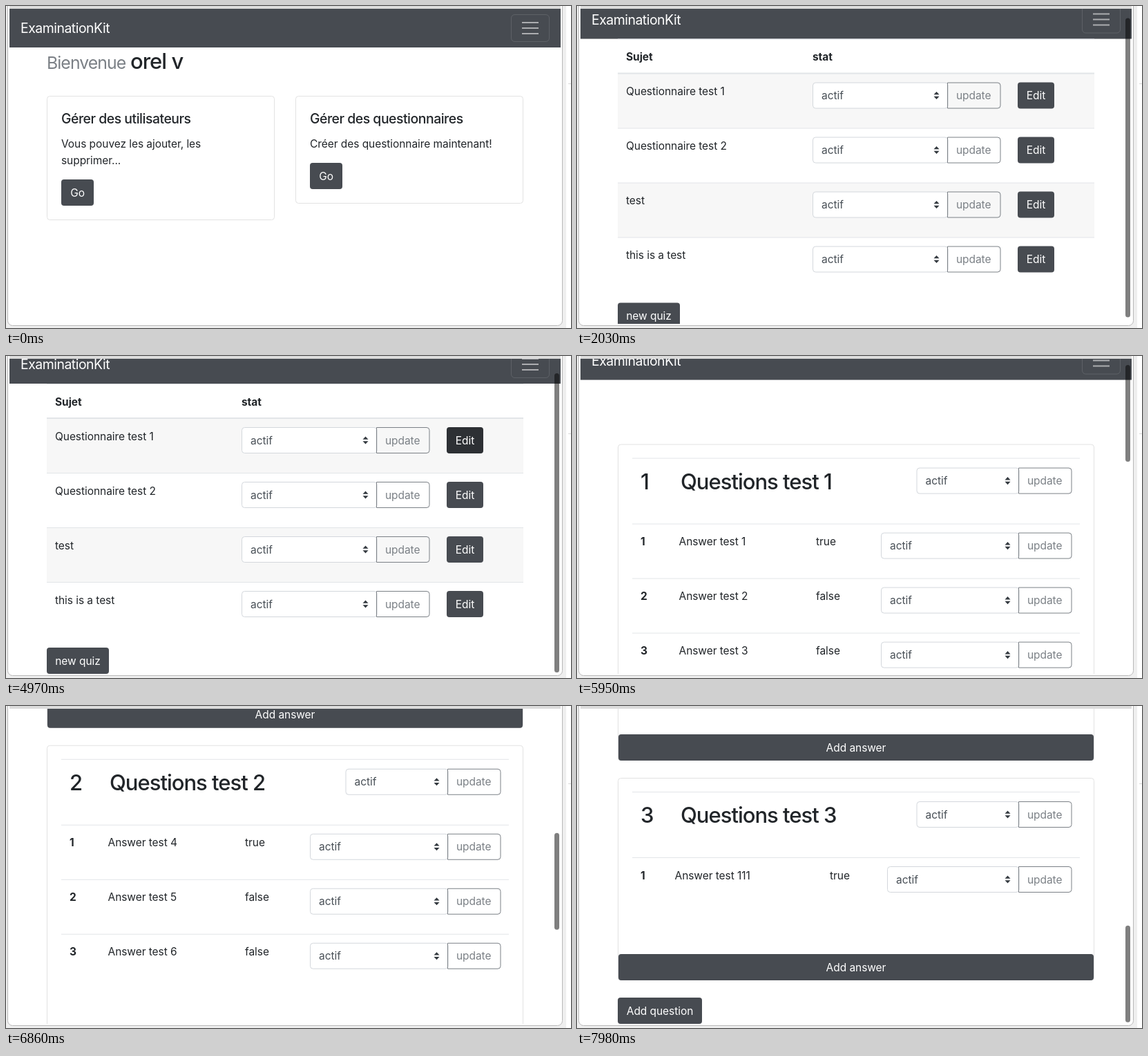
An HTML page that plays this animation: 818 px wide and 466 px high, repeating every 8 s.

```html
<!DOCTYPE html>
<html lang="fr">
<head>
<meta charset="utf-8">
<style>
  html, body { margin: 0; width: 100%; height: 100%; overflow: hidden; background: #efefef; }
  svg { display: block; }
  text { font: 15.5px Inter, "Open Sans", sans-serif; font-optical-sizing: none; letter-spacing: -.06px; fill: #212529; }
  .bold { font-weight: 700; }
  .mid { text-anchor: middle; }
  .white { fill: #fff; }
  .field { fill: #495057; }
  .mute { fill: #7b8086; }
  .brand, .title { font-size: 19.4px; letter-spacing: -.47px; }
  .title { font-weight: 500; }
  .big { font-size: 31px; font-weight: 500; letter-spacing: -1px; }
  .small { font-size: 24.8px; letter-spacing: -.93px; }
  .cross { font-size: 24px; font-weight: 700; fill: #7f7f7f; }
  .dark { fill: #474b51; }
  .hover { fill: #2d3034; }
  .card { fill: #fff; stroke: #e2e2e2; }
  .input { fill: #fff; stroke: #d3d7dc; }
  .outline { fill: none; stroke: #7b8086; }
  .line { stroke: #e2e5e8; }
</style>
</head>
<body>
<svg width="818" height="466" viewBox="0 0 818 466">
  <rect x="811" width="7" height="466" fill="#fff"/>
  <path d="M814 112.5h4" stroke="#d8d8d8"/>
  <rect x="2.5" y="-10" width="803" height="472.5" rx="7" fill="#fff" stroke="#b8b8b8"/>
  <rect x="5" width="798" height="4" fill="#dcdcdc"/>
  <clipPath id="view"><rect x="5" y="4" width="798" height="456"/></clipPath>
  <g clip-path="url(#view)">
    <g id="page"><g id="nav"></g><g id="home"></g><g id="list"></g><g id="edit"></g></g>
    <rect id="shade" x="5" y="4" width="798" height="455"/>
    <g id="modal"></g>
    <rect id="bar" x="794" width="7" rx="3.5" fill-opacity=".5"/>
  </g>
</svg>
<script>
const $ = id => document.getElementById(id);
const text = (x, y, s, cls = '') => `<text x="${x}" y="${y}" class="${cls}">${s}</text>`;
const rect = (x, y, w, h, cls, more = '') =>
  `<rect x="${x}" y="${y}" width="${w}" height="${h}" class="${cls}" ${more}/>`;
const line = (x1, x2, y, w = 1) => `<path class="line" d="M${x1} ${y}H${x2}" stroke-width="${w}"/>`;
const button = (x, y, w, label, id = '') =>
  rect(x, y, w, 38, 'dark', `rx="4" id="${id}"`) + text(x + w / 2, y + 24.7, label, 'mid white');
const arrows = (x, y) =>
  `<path transform="translate(${x} ${y})" d="M-4-1.2l4-4.4 4 4.4zM-4 1.2l4 4.4 4-4.4z" fill="#343a40"/>`;
const select = (x, y, right, label) =>
  rect(x + .5, y + .5, right - x - 1, 37, 'input', 'rx="4"') +
  text(x + 13, y + 24.7, label, 'field') + arrows(right - 17, y + 19);

// Select with an attached "update" button
const status = (x, y, split) => select(x, y, split + 1, 'actif') +
  `<path class="outline" d="M${split} ${y + .5}h72.5q4 0 4 4v29q0 4-4 4H${split}z"/>` +
  text(split + 12.5, y + 24.7, 'update', 'mute');

$('nav').innerHTML = rect(5, 4, 798, 56, 'dark') +
  text(21, 39, 'ExaminationKit', 'brand white') +
  '<rect x="731.5" y="12.5" width="55" height="39" rx="5" fill="none" stroke="#fff" stroke-opacity=".12"/>' +
  '<path d="M747 24h24M747 32h24M747 40h24" stroke="#fff" stroke-opacity=".55" stroke-width="2"/>';

$('home').innerHTML =
  text(59, 91, 'Bienvenue', 'small mute') + text(180, 91, 'orel v', 'big') +
  rect(59.5, 130.5, 329, 179, 'card', 'rx="4"') +
  text(80, 170, 'Gérer des utilisateurs', 'title') +
  text(80, 205, 'Vous pouvez les ajouter, les') + text(80, 229, 'supprimer...') +
  button(80, 251, 47, 'Go') +
  rect(419.5, 130.5, 329, 155, 'card', 'rx="4"') +
  text(440, 170, 'Gérer des questionnaires', 'title') +
  text(440, 205, 'Créer des questionnaire maintenant!') +
  button(440, 227, 47, 'Go');

const quizzes = ['Questionnaire test 1', 'Questionnaire test 2', 'test', 'this is a test'];
$('list').innerHTML = line(59, 749, 60.5) +
  text(71, 91.5, 'Sujet', 'bold') + text(341, 91.5, 'stat', 'bold') +
  quizzes.map((name, i) => {
    const y = 110.5 + 79 * i;
    return (i % 2 ? '' : rect(59, y, 690, 79, '', 'fill="#f7f7f7"')) +
      line(59, 749, y - (i ? 0 : .5), i ? 1 : 2) + text(71, y + 31, name) +
      status(341, y + 12.5, 536.5) + button(638, y + 12.5, 53, 'Edit', 'edit' + i);
  }).join('') +
  '<rect id="ring" x="57.5" y="440.5" width="93" height="41" rx="5.5" fill="none" stroke="#a8abae" stroke-width="3"/>' +
  button(59, 442, 90, 'new quiz', 'newQuiz');

// One question card; answers are [label, value] pairs
function question(n, top, answers, cols) {
  const first = top + 115, end = first + 79 * answers.length + 60;
  return rect(59.5, top, 689, end + 38 - top, 'card', 'rx="4"') +
    line(80, 728, top + 20) +
    text(92, top + 64.5, n, 'big') + text(150, top + 64.5, 'Questions test ' + n, 'big') +
    status(491.5, top + 33.5, 639.5) +
    answers.map(([label, value], i) => {
      const y = first + 79 * i;
      return line(80, 728, y) + text(92, y + 31, i + 1, 'bold') +
        text(cols[0], y + 31, 'Answer test ' + label) + text(cols[1], y + 31, value) +
        status(cols[2], y + 12.5, 639.5);
    }).join('') +
    button(60, end + .5, 688, 'Add answer');
}
const wide = [147.5, 346, 440];
$('edit').innerHTML =
  question(1, 153.5, [[1, 'true'], [2, 'false'], [3, 'false']], wide) +
  question(2, 629.5, [[4, 'true'], [5, 'false'], [6, 'false']], wide) +
  question(3, 1105.5, [[111, 'true']], [141.5, 366, 449]) +
  button(59, 1423, 122, 'Add question');

$('modal').innerHTML = rect(155, 31, 498, 400.5, '', 'rx="5" fill="#fff"') +
  text(171, 69, 'Add a new quiz', 'title') + text(628.5, 70.5, '×', 'cross mid') +
  line(155, 653, 94.5) +
  text(171, 128.7, 'Sujet') + rect(171.5, 142.5, 227, 37.5, 'input', 'rx="4"') +
  text(171, 214.7, 'Stat') + select(171, 228.5, 399, 'Choose...') +
  button(171, 306.5, 55, 'Add') + line(155, 653, 361) + button(570, 377.5, 67, 'Close');

const clamp = v => Math.max(0, Math.min(1, v));
const ramp = (t, from, to) => clamp((t - from) / (to - from));
const easeOut = p => 1 - (1 - p) ** 2;

// Hermite curve through [time, value, speed] keys
function curve(t, keys) {
  for (let i = 1; i < keys.length; i++) {
    const [t0, a, u] = keys[i - 1], [t1, b, v] = keys[i];
    if (t > t1) continue;
    const d = t1 - t0, p = ramp(t, t0, t1), q = 1 - p;
    return q * q * (1 + 2 * p) * a + p * p * (1 + 2 * q) * b + p * q * d * (q * u - p * v);
  }
  return keys[keys.length - 1][1];
}
const listScroll = [[1540, 0, 0], [2380, 20, 0]];
const editScroll = [[5740, 0, 0], [6440, 230, .55], [7280, 872.5, .35], [7980, 1001, 0]];

const show = (id, on) => $(id).style.display = on ? '' : 'none';
const hover = (id, on) => $(id).setAttribute('class', on ? 'hover' : 'dark');

function draw(t) {
  const scene = t < 770 ? 'home' : t < 5110 ? 'list' : 'edit';
  const onEdit = scene === 'edit';
  for (const id of ['home', 'list', 'edit']) show(id, id === scene);
  const scroll = curve(t, onEdit ? editScroll : listScroll);
  $('page').setAttribute('transform', `translate(0 ${-scroll})`);

  hover('newQuiz', t >= 2730 && t < 3080);
  hover('edit0', t >= 4690);
  show('ring', t >= 4110 && t < 4900);

  const shade = ramp(t, 3010, 3150) - ramp(t, 3950, 4110);
  const alpha = ramp(t, 3080, 3220) - ramp(t, 3650, 3800);
  const slide = easeOut(ramp(t, 3080, 3290)) - easeOut(ramp(t, 3650, 3930));
  $('shade').setAttribute('opacity', .46 * shade);
  $('modal').setAttribute('opacity', alpha);
  $('modal').setAttribute('transform', `translate(0 ${50 * (slide - 1)})`);

  show('bar', t >= 1610 && t < 3080 || t >= 4110 && t < 5110 || t >= 5810);
  $('bar').setAttribute('y', 5 + (onEdit ? scroll / 3.2 : scroll));
  $('bar').setAttribute('height', onEdit ? 140 : 433);
}

function tick() {
  const t = performance.now() % 8000;
  draw(t - t % 70);
  requestAnimationFrame(tick);
}
tick();
</script>
</body>
</html>
```
